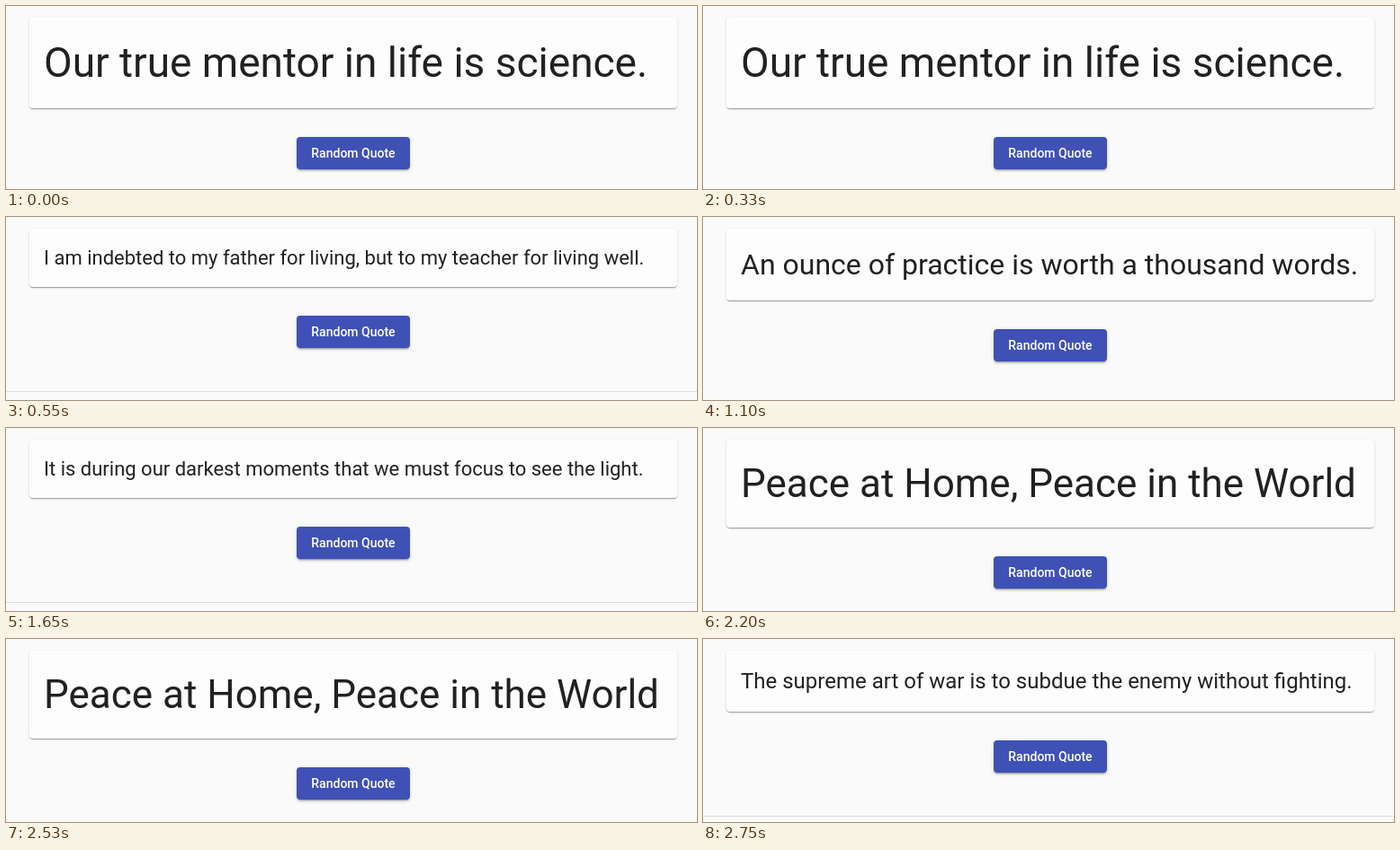
These frames come from a looping animation (768x204 px, 3300 ms). An HTML page:

```html
<!DOCTYPE html>
<html lang="en">
<head>
<meta charset="utf-8">
<title>Random Quote</title>
<style>
  html, body {
    margin: 0;
    width: 100%;
    height: 100%;
    overflow: hidden;
    background: #fafafa;
    font-family: Roboto, sans-serif;
  }
  .page {
    position: absolute;
    top: 13px;
    left: 0;
    width: 768px;
  }
  .card {
    box-sizing: border-box;
    width: 720px;
    margin-left: 26px;
    padding: 16px;
    border-radius: 4px;
    background: #fdfdfd;
    color: rgba(0, 0, 0, .87);
    line-height: 1.5;
    white-space: nowrap;
    box-shadow: 0 2px 1px -1px rgba(0, 0, 0, .2),
                0 1px 1px rgba(0, 0, 0, .14),
                0 1px 3px rgba(0, 0, 0, .12);
  }
  .actions {
    width: 720px;
    margin: 32px 0 48px 26px;
    text-align: center;
    height: 36px;
  }
  button {
    display: inline-block;
    height: 36px;
    margin: 0;
    padding: 0 16px;
    border: 0;
    border-radius: 4px;
    background: #3f51b5;
    color: #fff;
    font: 500 14px/36px Roboto, sans-serif;
    vertical-align: top;
    box-shadow: 0 3px 1px -2px rgba(0, 0, 0, .2),
                0 2px 2px rgba(0, 0, 0, .14),
                0 1px 5px rgba(0, 0, 0, .12);
  }
  .divider {
    height: 1px;
    background: rgba(0, 0, 0, .12);
  }
</style>
</head>
<body>
<div class="page">
  <div class="card" id="quote"></div>
  <div class="actions"><button type="button">Random Quote</button></div>
  <div class="divider"></div>
</div>
<script>
  const STEP = 550;
  // Each quote is sized to fill one line of the card.
  const quotes = [
    { size: 46, text: "Our true mentor in life is science." },
    { size: 22, text: "I am indebted to my father for living, but to my teacher for living well." },
    { size: 32, text: "An ounce of practice is worth a thousand words." },
    { size: 22, text: "It is during our darkest moments that we must focus to see the light." },
    { size: 44, text: "Peace at Home, Peace in the World" },
    { size: 24, text: "The supreme art of war is to subdue the enemy without fighting." }
  ];
  const card = document.getElementById("quote");
  let shown = -1;

  function show(index) {
    if (index === shown) return;
    shown = index;
    card.style.fontSize = quotes[index].size + "px";
    card.textContent = quotes[index].text;
  }

  const start = performance.now();
  function tick() {
    const elapsed = performance.now() - start;
    show(Math.floor(elapsed / STEP) % quotes.length);
    requestAnimationFrame(tick);
  }
  tick();
</script>
</body>
</html>
```
